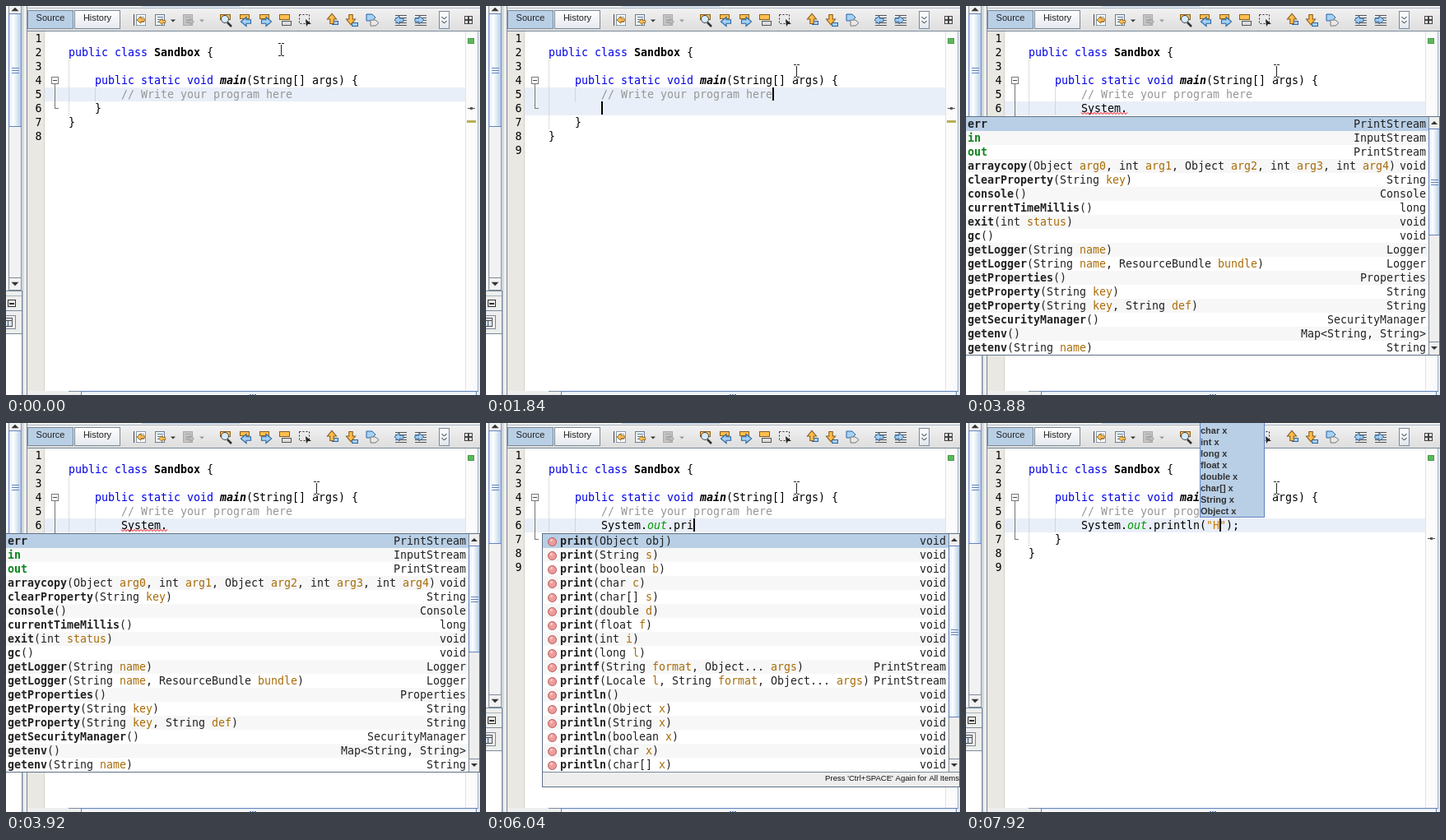
Animation of 576x473 px, one loop 8000 ms. Source, as an HTML page with a canvas:

```html
<!DOCTYPE html>
<html lang="en">
<head>
<meta charset="utf-8">
<title>Code completion</title>
<style>
html, body { margin: 0; width: 576px; height: 473px; overflow: hidden; background: #eee; }
canvas { display: block; }
</style>
</head>
<body>
<canvas id="stage" width="576" height="473"></canvas>
<script>
const ctx = document.getElementById('stage').getContext('2d');
const LOOP = 8000, CH = 8, ROW = 17;
const MONO = '13.29px "DejaVu Sans Mono", monospace';
const SANS = '"Liberation Sans", Arial, sans-serif';
const BLUE = '#b8cfe5', EDGE = '#7a8a99', KEY = '#0000e6', PARAM = '#a86c08', GREEN = '#098618';
const THUMB = ['#dde8f3', '#fff', '#dde8f3', '#b8cfe5'];

const CODE = 'System.out.println';
const KEYS = [2480, 2760, 2880, 3080, 3160, 3280, 3640, 4280, 4440, 4720, 4920,
  5560, 5800, 6040, 6080, 6240, 6640, 6760];

const SYSTEM = ['err|PrintStream', 'in|InputStream', 'out|PrintStream',
  'arraycopy(Object arg0, int arg1, Object arg2, int arg3, int arg4)|void',
  'clearProperty(String key)|String', 'console()|Console', 'currentTimeMillis()|long',
  'exit(int status)|void', 'gc()|void', 'getLogger(String name)|Logger',
  'getLogger(String name, ResourceBundle bundle)|Logger', 'getProperties()|Properties',
  'getProperty(String key)|String', 'getProperty(String key, String def)|String',
  'getSecurityManager()|SecurityManager', 'getenv()|Map<String, String>', 'getenv(String name)|String'];
const voids = (name, args) => args.map(a => `${name}(${a})|void`);
const PRINT = voids('print', ['Object obj', 'String s', 'boolean b', 'char c', 'char[] s',
  'double d', 'float f', 'int i', 'long l']);
const PRINTLN = voids('println', ['', 'Object x', 'String x', 'boolean x', 'char x', 'char[] x',
  'double x', 'float x', 'int x', 'long x']);
const FORMATS = name => [`${name}(String format, Object... args)|PrintStream`,
  `${name}(Locale l, String format, Object... args)|PrintStream`];
const MEMBERS = ['append(CharSequence csq)|PrintStream', 'append(char c)|PrintStream',
  'append(CharSequence csq, int start, int end)|PrintStream', 'checkError()|boolean', 'close()|void',
  'equals(Object obj)|boolean', 'flush()|void', ...FORMATS('format'), 'getClass()|Class<?>',
  'hashCode()|int', 'notify()|void', 'notifyAll()|void', ...PRINT.slice(0, 4)];
const PRINTS = [...PRINT, ...FORMATS('printf'), ...PRINTLN.slice(0, 6)];
const HINTS = ['char', 'int', 'long', 'float', 'double', 'char[]', 'String', 'Object'];

const between = (t, a, b) => t >= a && t < b;
const rowTop = n => 31 + ROW * (n - 1);

function rect(x, y, w, h, color) {
  ctx.fillStyle = color;
  ctx.fillRect(x, y, w, h);
}
function frame(x, y, w, h, color) {
  ctx.strokeStyle = color;
  ctx.lineWidth = 1;
  ctx.strokeRect(x + .5, y + .5, w - 1, h - 1);
}
function shade(x, y, w, h, stops, down) {
  const g = ctx.createLinearGradient(x, y, down ? x : x + w, down ? y + h : y);
  stops.forEach((c, i) => g.addColorStop(i / (stops.length - 1), c));
  rect(x, y, w, h, g);
}
function poly(points, fill, stroke) {
  ctx.beginPath();
  points.forEach(([x, y]) => ctx.lineTo(x, y));
  ctx.closePath();
  if (fill) { ctx.fillStyle = fill; ctx.fill(); }
  if (stroke) { ctx.strokeStyle = stroke; ctx.lineWidth = 1; ctx.stroke(); }
}
function disc(x, y, r, fill, stroke) {
  ctx.beginPath();
  ctx.arc(x, y, r, 0, 7);
  ctx.fillStyle = fill;
  ctx.fill();
  ctx.strokeStyle = stroke;
  ctx.lineWidth = 1;
  ctx.stroke();
}
function label(s, x, y, font, color = '#222', align = 'left') {
  ctx.font = font;
  ctx.fillStyle = color;
  ctx.textAlign = align;
  ctx.fillText(s, x, y);
}
// Draws [text, colour, style] parts one after another in the fixed-width font.
function mono(parts, x, y) {
  for (const [s, color = '#000', style = ''] of parts) {
    label(s, x, y, style + ' ' + MONO, color);
    x += s.length * CH;
  }
}

// dir: 0 right, 1 down, 2 left, 3 up
function arrow(x, y, dir, fill, stroke, k = 1) {
  ctx.save();
  ctx.translate(x, y);
  ctx.rotate(dir * Math.PI / 2);
  ctx.scale(k, k);
  poly([[-5, -2], [0, -2], [0, -5], [6, 0], [0, 5], [0, 2], [-5, 2]], fill, stroke);
  ctx.restore();
}
function tri(x, y, up, s = 4, color = '#333') {
  const d = up ? -s : s;
  poly([[x - s, y - d / 2], [x + s, y - d / 2], [x, y + d / 2]], color);
}
function page(x, fill, line) {
  rect(x, 10, 12, 14, fill);
  frame(x, 10, 12, 14, line);
  for (let y = 13; y < 22; y += 3) rect(x + 3, y, 7, 1, line);
}
function box(x, y, w, h, fill, line) {
  rect(x, y, w, h, fill);
  frame(x, y, w, h, line);
}
function bumps(x, y, wide) {
  for (let i = 0; i < 3; i++)
    wide ? rect(x - 4 + i * 3, y, 2, 1, '#6382bf') : rect(x - 4, y - 3 + i * 3, 9, 1, '#6382bf');
}

function toolbar() {
  shade(26, 0, 550, 30, ['#f3f3f3', '#dedede'], true);
  rect(165, 0, 120, 1, BLUE);
  rect(26, 2, 550, 1, '#a9b5c2');
  rect(26, 30, 550, 1, EDGE);

  box(26, 5, 56, 23, BLUE, EDGE);
  shade(83, 5, 56, 23, ['#fff', '#e4e9ef'], true);
  frame(83, 5, 56, 23, EDGE);
  label('Source', 54, 18, '11px ' + SANS, '#222', 'center');
  label('History', 111, 18, '11px ' + SANS, '#222', 'center');

  const gold = '#ffbf4f', brown = '#8a5c1c', sky = '#a4d0f5', navy = '#2f659e';
  page(158, '#fff', '#8a9cb0');
  rect(155, 10, 1, 14, '#444');
  arrow(164, 17, 2, gold, brown, .85);
  page(181, '#e8f2fc', '#6b7e94');
  arrow(190, 19, 2, gold, brown, .75);
  tri(203, 18, false, 3);
  page(215, '#c4c4c4', '#aaa');
  arrow(224, 19, 0, '#bbb', '#999', .75);
  tri(238, 18, false, 3, '#999');

  box(260, 10, 13, 7, gold, brown);
  disc(266, 16, 4.5, '#d5ecff', '#444');
  ctx.strokeStyle = '#333';
  ctx.lineWidth = 2.5;
  ctx.beginPath();
  ctx.moveTo(269, 20);
  ctx.lineTo(274, 25);
  ctx.stroke();
  for (const [x, dir] of [[291, 2], [315, 0]]) {
    box(x - 7, 10, 12, 6, gold, brown);
    arrow(x + 1, 19, dir, sky, navy, 1.1);
  }
  box(332, 10, 13, 7, gold, brown);
  box(335, 18, 12, 6, '#ddd', '#555');
  ctx.setLineDash([2, 2]);
  frame(356, 10, 13, 12, '#333');
  ctx.setLineDash([]);
  poly([[364, 16], [371, 22], [367, 22], [365, 25]], '#222');

  box(396, 18, 8, 5, sky, navy);
  arrow(396, 16, 3, gold, brown, 1.1);
  box(420, 20, 8, 5, sky, navy);
  arrow(419, 16, 1, gold, brown, 1.1);
  poly([[438, 10], [445, 10], [449, 14], [445, 18], [438, 18]], sky, navy);
  poly([[443, 17], [449, 17], [453, 20.5], [449, 24], [443, 24]], '#e8e8e8', '#777');

  for (const [x, dir] of [[479, 2], [503, 0]]) {
    for (let y = 11; y < 25; y += 3) rect(x - 6, y, 14, 1, '#555');
    arrow(x - 1, 17, dir, sky, navy);
  }
  shade(526, 6, 13, 22, ['#fff', '#dfe6ee'], true);
  frame(526, 6, 13, 22, EDGE);
  ctx.strokeStyle = '#222';
  ctx.lineWidth = 1;
  for (const y of [13, 18]) {
    ctx.beginPath();
    ctx.moveTo(529.5, y);
    ctx.lineTo(532.5, y + 3);
    ctx.lineTo(535.5, y);
    ctx.stroke();
  }
  frame(557, 12, 10, 10, '#444');
  rect(558, 16, 8, 2, '#444');
  rect(561, 13, 2, 8, '#444');
}

function sidePanel() {
  rect(0, 0, 26, 473, '#eee');
  rect(0, 0, 3, 346, '#fff');
  rect(3, 0, 16, 346, '#f2f2f2');
  frame(3, -1, 16, 347, EDGE);
  tri(11, 4, true, 4.5);
  shade(4, 10, 14, 136, THUMB);
  frame(3, 9, 16, 138, '#6382bf');
  bumps(11, 78);
  rect(4, 330, 14, 1, EDGE);
  tri(11, 338, false, 4.5);
  rect(0, 346, 19, 1, EDGE);
  rect(0, 352, 20, 1, '#a9b5c2');
  frame(2, 357, 10, 9, '#333');
  rect(4, 361, 6, 2, '#333');
  rect(0, 370, 20, 1, EDGE);
  frame(-4, 376, 16, 17, EDGE);
  rect(0, 379, 8, 11, '#d7e5f3');
  frame(-2, 379, 10, 11, '#555');
  rect(2, 382, 1, 8, '#555');
  rect(0, 382, 8, 1, '#555');
  rect(0, 399, 19, 74, '#fff');
  rect(0, 398, 20, 1, EDGE);
  rect(19, 346, 1, 127, EDGE);
  rect(20, 0, 1, 473, '#b4bfca');
  rect(25, 0, 1, 473, EDGE);
}

function editor(t) {
  const entered = t >= 1840, settled = t >= 1880;
  const error = between(t, 4040, 4440) || between(t, 5120, 5600);
  rect(26, 31, 550, 442, '#fff');
  rect(26, 31, 20, 437, '#e9e8e2');
  rect(46, 31, 1, 437, '#d4d2ca');
  if (!settled) rect(47, 99, 512, ROW, '#e9eff8');
  if (entered) rect(47, 116, 512, ROW, '#e9eff8');

  for (let n = 1; n <= (entered ? 9 : 8); n++) {
    if (n === 6 && error) {
      disc(40, 124, 5, '#e23b3b', '#a01818');
      rect(39, 121, 2, 4, '#fff');
      rect(39, 126, 2, 1, '#fff');
    } else label(n, 35.5, rowTop(n) + 13, MONO, '#000');
  }

  // Fold marker and indent guides
  const foldEnd = settled ? 141 : 124;
  rect(59, 95, 1, foldEnd - 94, '#777');
  rect(59, foldEnd, 5, 1, '#777');
  box(55, 86, 9, 9, '#fff', '#777');
  rect(57, 90, 5, 1, '#444');
  for (let y = 66; y < (entered ? 150 : 133); y += 2) rect(76, y, 1, 1, '#bbb');
  for (let y = 99; y < (t >= 2480 ? 133 : 116); y += 2) rect(108, y, 1, 1, '#bbb');

  mono([['public class ', KEY], ['Sandbox', '#000', 'bold'], [' {']], 76, rowTop(2) + 13);
  mono([['public static void ', KEY], ['main', '#000', 'italic bold'], ['(String[] args) {']],
    108, rowTop(4) + 13);
  mono([['// Write your program here', '#969696']], 140, rowTop(5) + 13);
  const close = entered ? 7 : 6;
  mono([['}']], 108, rowTop(close) + 13);
  mono([['}']], 76, rowTop(close + 1) + 13);

  const count = KEYS.filter(k => t >= k).length;
  const typed = CODE.slice(0, count);
  const known = t >= 5120;
  const parts = [[typed.slice(0, 7)], [typed.slice(7, 10), known ? '#009900' : '#000', known ? 'italic' : ''],
    [typed.slice(10)]];
  let column = count;
  if (t >= 7680) {
    const quoted = t >= 7840 ? '"H"' : '""';
    parts.push(['('], [quoted, '#ce7b00'], [');']);
    column += quoted.length;
  }
  mono(parts, 140, rowTop(6) + 13);

  if (between(t, 3880, 4280) || between(t, 5120, 5560)) {
    ctx.strokeStyle = '#f00';
    ctx.lineWidth = 1;
    ctx.beginPath();
    for (let x = 0; x <= count * CH; x += 2) ctx.lineTo(140 + x, x % 4 ? 131.5 : 129.5);
    ctx.stroke();
  }
  if (between(t, 800, 1160) || between(t, 1480, 1880)) rect(348, 99, 2, 16, '#000');
  if (entered && !between(t, 2200, 2480) && !between(t, 3880, 4280))
    rect(140 + column * CH, 116, 2, 16, '#000');

  // Overview strip
  rect(559, 31, 14, 442, '#fbfbfb');
  rect(558, 31, 1, 442, '#e2e2e2');
  rect(573, 31, 1, 442, '#9fb2c6');
  rect(574, 31, 2, 442, '#e3e8ee');
  box(561, 39, 8, 7, error ? '#e04040' : '#5cb85c', error ? '#b02020' : '#4a9c4a');
  const tick = settled ? 140 : 124;
  rect(561, tick, 9, 1, '#555');
  rect(564, tick - 1, 3, 3, '#555');
  if (t < 3880) rect(560, settled ? 156 : 139, 11, 3, '#b9ae58');

  // Horizontal scrollbar
  rect(26, 468, 548, 5, '#eee');
  rect(76, 468, 498, 1, EDGE);
  shade(92, 469, 479, 4, ['#dde8f3', '#fff'], true);
  frame(91, 468, 481, 9, '#6382bf');
  bumps(300, 472, true);
}

function pointer(t) {
  const move = (a, b) => Math.min(1, Math.max(0, (Math.floor(t / 40) * 40 - a) / (b - a)));
  const ease = p => p * p * (3 - 2 * p);
  const p = ease(move(400, 760)), q = ease(move(840, 1160));
  const x = Math.round(334 + 20 * p + 23 * q), y = Math.round(53 + 53 * p - 27 * q);
  const beam = (g, c) => {
    rect(x - g, y - 6 - g, 1 + 2 * g, 13 + 2 * g, c);
    for (const dy of [-8, 7]) {
      rect(x - 3 - g, y + dy - g, 3 + 2 * g, 1 + 2 * g, c);
      rect(x + 1 - g, y + dy - g, 3 + 2 * g, 1 + 2 * g, c);
    }
  };
  beam(1, '#fff');
  beam(0, '#222');
}

function signature(s, x, y, field, selected) {
  const [, name, rest] = s.match(/^(\w+)(.*)$/);
  const parts = rest.split(/(?<= )(\w+)(?=[,)])/);
  mono([[name, field && !selected ? GREEN : '#222', 'bold'],
    ...parts.map((p, i) => [p, i % 2 && !selected ? PARAM : '#222'])], x, y);
}

function popup(left, right, rows, footer, thumb) {
  const h = rows.length * ROW, bottom = 135 + h;
  rect(left, 134, right - left, h + (footer ? 20 : 2), '#fff');
  rows.forEach((row, i) => {
    const y = 135 + i * ROW, [sig, type] = row.split('|');
    rect(left, y, right - left, ROW, i === 0 ? BLUE : i % 2 ? '#f7f7f7' : '#fff');
    disc(left + 12.5, y + 9.5, 5, '#ee9c9c', '#b95757');
    disc(left + 11.5, y + 7.5, 1.5, '#fbd3d3', '#f3b5b5');
    signature(sig, left + 22, y + 13, !sig.includes('('), i === 0);
    label(type, thumb ? 559 : right - 3, y + 13, MONO, '#222', 'right');
  });
  if (thumb) {
    rect(562, 135, 14, h, '#eee');
    rect(562, 135, 1, h, EDGE);
    tri(569, 142, true);
    shade(563, 150, 12, thumb - 150, THUMB);
    frame(562, 149, 14, thumb - 148, '#6382bf');
    bumps(569, Math.round((150 + thumb) / 2));
    rect(562, 408, 14, 1, EDGE);
    tri(569, 416, false);
  }
  if (footer) {
    rect(left, bottom, right - left, 19, '#eee');
    rect(left, bottom, right - left, 1, EDGE);
    label("Press 'Ctrl+SPACE' Again for All Items", right - 1, bottom + 11, '9.55px ' + SANS, '#111', 'right');
  }
  frame(left, 134, right - left, h + (footer ? 20 : 2), '#5f7185');
}

function hints() {
  rect(284, 0, 79, 115, BLUE);
  frame(284, -1, 79, 116, '#6382bf');
  HINTS.forEach((type, i) => label(type + ' x', 285, 13 + 14 * i, 'bold 11px ' + SANS, '#333'));
}

function draw(t) {
  sidePanel();
  editor(t);
  toolbar();
  if (between(t, 3880, 4280)) popup(-20, 576, SYSTEM, false, 278);
  if (between(t, 5040, 5560)) popup(68, 576, MEMBERS, true, 320);
  if (between(t, 5560, 6640)) popup(68, 576, PRINTS, true, 357);
  if (between(t, 7080, 7680)) popup(206, 414, PRINTLN, true);
  if (t >= 7680) hints();
  pointer(t);
}

const start = performance.now();
function tick() {
  draw((performance.now() - start) % LOOP);
  requestAnimationFrame(tick);
}
tick();
</script>
</body>
</html>
```
